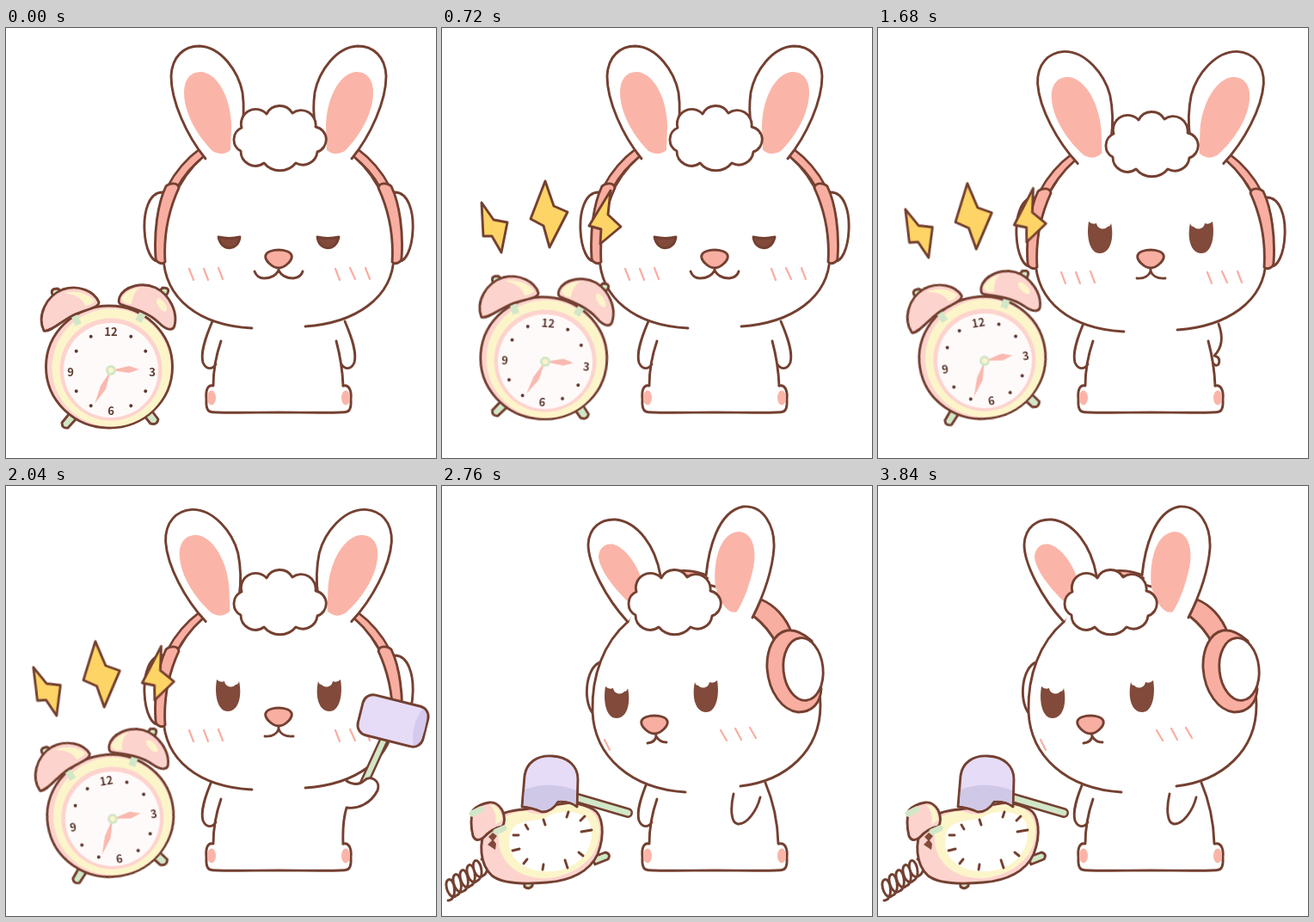
These frames come from a looping animation (500x500 px, 3960 ms). An HTML page:

```html
<!DOCTYPE html>
<html lang="en">
<head>
<meta charset="utf-8">
<title>Bunny and alarm clock</title>
<style>
html, body { margin: 0; width: 100%; height: 100%; overflow: hidden; background: #fff; }
svg { display: block; width: 100%; height: 100%; }
.ln { fill: none; stroke: #744031; stroke-width: 2.9; stroke-linecap: round; stroke-linejoin: round; }
.w { fill: #fff; }
.p { fill: #f9aea2; }
.ear { fill: #fab5a8; stroke: none; }
.dark { fill: #814a3a; }
.blush { fill: none; stroke: #f9aea2; stroke-width: 2.2; stroke-linecap: round; }
.rose { fill: #fdd3ce; }
.cream { fill: #fcf5ca; }
.mint { fill: #d1e7c7; }
.lilac { fill: #e6dcf8; }
.num { font: 700 13px "Noto Sans CJK SC", "Noto Sans", sans-serif; fill: #5c3a30; text-anchor: middle; }

/* one step is 120 ms, 33 steps in a loop */
.at, .dip { animation: 3960ms step-end infinite; }
.calm { animation-name: calm; }
.ring { animation-name: ring; }
.broken { animation-name: broken; }
.smile { animation-name: smile; }
.frown { animation-name: frown; }
.sleepy { animation-name: sleepy; }
.awake { animation-name: awake; }
.front { animation-name: front; }
.rest { animation-name: rest; }
.reach { animation-name: reach; }
.pull { animation-name: pull; }
.raise { animation-name: raise; }
.turned { animation-name: turned; }
.perk { animation-name: perk; }
.dip { animation-name: dip; }
@keyframes calm { 0% { opacity: 1 } 18.18%, 100% { opacity: 0 } }
@keyframes ring { 0%, 63.63%, 100% { opacity: 0 } 18.18% { opacity: 1 } }
@keyframes broken { 0% { opacity: 0 } 63.63%, 100% { opacity: 1 } }
@keyframes smile { 0% { opacity: 1 } 24.24%, 100% { opacity: 0 } }
@keyframes frown { 0%, 33.33%, 100% { opacity: 0 } 24.24% { opacity: 1 } }
@keyframes sleepy { 0% { opacity: 1 } 33.33%, 100% { opacity: 0 } }
@keyframes awake { 0%, 54.54%, 100% { opacity: 0 } 33.33% { opacity: 1 } }
@keyframes front { 0% { opacity: 1 } 54.54%, 100% { opacity: 0 } }
@keyframes rest { 0% { opacity: 1 } 39.39%, 100% { opacity: 0 } }
@keyframes reach { 0%, 45.45%, 100% { opacity: 0 } 39.39% { opacity: 1 } }
@keyframes pull { 0%, 54.54%, 100% { opacity: 0 } 45.45% { opacity: 1 } }
@keyframes raise { 0%, 63.63%, 100% { opacity: 0 } 54.54% { opacity: 1 } }
@keyframes turned {
  0% { opacity: 0; transform: translate(4px, 0) }
  54.54% { opacity: 1; transform: translate(4px, 0) }
  63.63%, 100% { opacity: 1; transform: none }
}
@keyframes perk { 0% { transform: rotate(var(--r)) } 63.63%, 100% { transform: none } }
@keyframes dip { 0% { transform: none } 33.33%, 100% { transform: translateY(var(--d)) } }

.shake { transform-origin: 122px 398px; animation: shake 360ms step-end infinite; }
.sway { transform-origin: 150px 410px; animation: sway 360ms step-end infinite; }
@keyframes shake {
  0%, 100% { transform: translate(-2px, -10px) rotate(4.4deg) }
  33.33% { transform: translate(1px, -10px) rotate(-4.4deg) }
  66.66% { transform: translate(2px, -11px) rotate(-9.4deg) }
}
@keyframes sway {
  0%, 100% { transform: none }
  33.33% { transform: rotate(-7deg) }
  66.66% { transform: rotate(-4deg) }
}
</style>
</head>
<body>
<svg viewBox="0 0 500 500">
<defs>
  <g id="cushion" class="ln">
    <path class="w" d="M183 191C166 190 160 214 161 235C162 258 170 272 177 271"/>
    <path d="M229 145Q206 162 193 187" stroke-linecap="butt" style="stroke-width:14"/>
    <path d="M229 145Q206 162 193 187" style="stroke:#f9aea2;stroke-width:9"/>
    <path d="M231 149Q210 165 199 186"/>
  </g>
  <path id="strip" class="ln p" d="M186 184C190 180 200 179 201 186C190 210 183 240 185 272C181 276 174 272 174 267C172 238 176 205 186 184Z"/>
  <g id="ear">
    <path class="ln w" d="M232 152C210 125 192 85 192 56C193 33 207 21 225 21C250 22 270 50 275 75C277 90 277 106 273 125"/>
    <path class="ear" d="M240 143C222 125 207 98 207 75C207 58 216 50 228 51C248 54 262 85 262 115L261 142Q251 150 240 143Z"/>
  </g>
  <path id="hair" class="ln w" d="M274 116A17 17 0 0 1 303 100A17 17 0 0 1 333 99A17 17 0 0 1 360 115A15 15 0 0 1 362 144A17 17 0 0 1 337 157A24 24 0 0 1 300 157A17 17 0 0 1 273 143A15 15 0 0 1 274 116Z"/>
  <path id="nose" class="ln p" d="M302 264C305 256 329 256 332 264C334 270 324 279 317 279C310 279 300 270 302 264Z"/>
  <path id="lid" class="ln dark" d="M247 243Q260 246 272 243C270 260 250 260 247 243Z"/>
  <path id="brow" class="ln" d="M262 239L270 236"/>
  <path id="eye" class="dark" d="M245 225Q249 229 254 227A7.5 7.5 0 0 0 267 231Q270 231 271 227C275 245 270 262 258 262C246 262 242 243 245 225Z"/>

  <g id="hammer">
    <path class="ln" d="M370 282L343 341" style="stroke-width:11"/>
    <path class="ln" d="M370 282L343 341" style="stroke:#d1e7c7;stroke-width:6"/>
    <g transform="rotate(14 380 261)">
      <rect class="ln lilac" x="341" y="237" width="78" height="48" rx="12"/>
      <path d="M410 239Q401 261 410 283Q418 281 418 261Q418 241 410 239Z" fill="#d6c9ee"/>
    </g>
  </g>

  <g id="clock">
    <g class="ln mint">
      <path d="M74 448L65 459Q65 466 72 465L82 454Z"/>
      <path d="M160 450L168 460Q176 462 177 455L168 443Z"/>
      <path d="M62 316L54 310Q51 303 60 303L68 309Z"/>
      <path d="M177 308L182 302Q191 302 188 308L183 316Z"/>
    </g>
    <ellipse class="ln rose" cx="120" cy="394" rx="73.5" ry="71"/>
    <ellipse class="cream" cx="122.5" cy="395" rx="69" ry="68.5"/>
    <circle class="rose" cx="122" cy="397" r="59.5"/>
    <circle cx="122" cy="398" r="55" fill="#fffafa"/>
    <path d="M79 333L84 345M160 330L154 341" stroke="#d1e7c7" stroke-width="8"/>
    <g class="ln rose">
      <path d="M44 352C36 335 46 312 66 304C84 298 103 306 108 319C108 325 95 327 80 333C65 340 52 354 44 352Z"/>
      <path d="M132 313C138 300 158 295 174 302C190 310 200 330 196 346C194 353 186 351 178 343C165 330 145 325 135 322C130 320 131 317 132 313Z"/>
    </g>
    <path class="cream" d="M68 308Q89 303 103 317Q100 322 92 323Q88 311 68 308ZM135 313Q142 303 156 302Q147 307 146 321Q134 320 135 313Z"/>
    <ellipse class="cream" cx="181" cy="322" rx="4" ry="9" transform="rotate(-35 181 322)"/>
    <circle cx="122" cy="399" r="46.5" fill="none" stroke="#5c3a30" stroke-width="4" stroke-linecap="round" pathLength="12" stroke-dasharray="0 1 0 2" transform="rotate(30 122 399)"/>
    <g class="num">
      <text x="122" y="358">12</text><text x="170" y="405">3</text>
      <text x="122" y="450">6</text><text x="75" y="405">9</text>
    </g>
    <path d="M122 398L143 393L155 397L143 401ZM122 398L116 420L103 437L110 416Z" fill="#f9b9b0"/>
    <circle cx="122" cy="398" r="6" class="mint"/>
    <circle cx="122" cy="398" r="3" class="cream"/>
  </g>
</defs>

<rect width="500" height="500" fill="#fff"/>

<g class="at calm"><use href="#clock"/></g>

<!-- body -->
<path class="ln" d="M240 341C231 362 226 378 229 389C233 398 240 397 244 391M250 364Q241 390 241 416C234 414 232 422 233 432Q232 446 239 446.5C250 448 290 447 317 447C345 447 384 448 395 446.5Q402 446 401 432C402 422 399 414 392 416"/>
<g class="ear"><ellipse cx="239" cy="430" rx="5" ry="8.5"/><ellipse cx="395" cy="430" rx="5" ry="8.5"/></g>
<path class="ln at rest" d="M394 341C403 362 408 378 405 389C401 398 394 397 390 391M384 364Q391 390 392 416"/>
<path class="ln at reach" d="M396 344C402 360 400 372 391 381Q399 383 396 391Q393 394 390 390M384 364Q391 390 392 416"/>
<path class="ln at broken" d="M376 345Q390 378 391 416M339 358C335 375 336 392 344 393C354 394 366 378 370 362"/>

<!-- head, facing ahead -->
<g class="at front">
  <g class="dip" style="--d:6px">
    <use href="#cushion"/>
    <use href="#cushion" transform="matrix(-1 0 0 1 634 0)"/>
  </g>
  <path class="ln w dip" style="--d:4px" d="M348 347C405 343 450 315 451 265C452 215 434 175 405 150C384 95 250 95 229 150C200 175 182 215 183 265C184 315 225 346 286 349"/>
  <g class="dip" style="--d:6px">
    <use href="#strip"/>
    <use href="#strip" transform="matrix(-1 0 0 1 634 0)"/>
  </g>
  <g class="at sleepy">
    <use href="#ear"/>
    <use href="#ear" transform="matrix(-1 0 0 1 634 0)"/>
    <use href="#lid"/>
    <use href="#lid" transform="matrix(-1 0 0 1 634 0)"/>
  </g>
  <g class="at awake">
    <g transform="translate(0 4)">
      <use href="#ear" transform="rotate(-4 255 150)"/>
      <use href="#ear" transform="matrix(-1 0 0 1 634 0) rotate(-4 255 150)"/>
    </g>
    <use href="#eye"/>
    <use href="#eye" transform="matrix(-1 0 0 1 634 0)"/>
    <path class="ln" d="M301 291Q313 292 317 283Q321 292 334 291"/>
  </g>
  <g class="at frown">
    <use href="#brow"/>
    <use href="#brow" transform="matrix(-1 0 0 1 634 0)"/>
    <path class="ln" d="M301 292Q313 291 317 283Q321 291 334 292"/>
  </g>
  <path class="ln at smile" d="M289 283Q292 291 300 291Q312 291 317 282Q322 291 334 291Q343 290 345 283"/>
  <g class="dip" style="--d:7px"><use href="#hair"/></g>
  <path class="ln" d="M317 279V283"/>
  <use href="#nose"/>
  <path class="blush dip" style="--d:4px" d="M213 280l5 13m12-13l5 13m12-14l5 13M383 280l5 13m12-14l6 13m12-13l5 13"/>
</g>

<g class="at pull">
  <use href="#hammer" transform="translate(70 12)"/>
  <path class="ln w" d="M396 343Q408 350 416 343C424 335 436 343 432 354C424 370 408 376 396 374Q391 390 392 416"/>
</g>

<!-- head, turned to the clock -->
<g class="at turned">
  <path class="ln w" d="M184 205C166 211 163 255 178 267"/>
  <path class="ln p" d="M266 100Q290 95 310 105L306 110Z"/>
  <path class="ln w" d="M347 349C400 343 440 308 440 255C440 205 395 160 361 150C340 100 235 100 216 158C188 182 174 220 175 262C177 315 220 352 283 356"/>
  <path class="ln p" d="M362 151L371 132C386 138 400 152 407 172L389 184Q380 165 362 151Z"/>
  <g class="at perk" style="--r:2.5deg;transform-origin:235px 150px">
    <path class="ln w" d="M216 158C190 130 170 90 170 68C171 48 185 38 202 39C228 42 248 70 254 104"/>
    <path class="ear" d="M222 140C202 122 183 98 182 82C183 70 192 66 200 68C216 73 232 100 233 115Z"/>
  </g>
  <g class="at perk" style="--r:-3.5deg;transform-origin:335px 135px">
    <path class="ln w" d="M307 104C310 75 320 30 350 24C375 22 387 48 386 72C384 100 375 125 361 153"/>
    <path class="ear" d="M318 118C315 95 320 55 345 53C362 54 366 75 362 95C358 115 350 135 343 146C335 150 325 140 318 118Z"/>
  </g>
  <use href="#hair" x="-48" y="7"/>
  <path class="ln p" d="M401 168C386 171 377 190 378 212C380 240 396 261 414 263C430 263 440 253 441 236L430 180Q414 166 401 168Z"/>
  <ellipse class="ln w" cx="420" cy="213" rx="23" ry="36.5" transform="rotate(-6 420 213)"/>
  <use href="#eye" x="-55" y="8"/>
  <use href="#eye" transform="matrix(-1 0 0 1 565 1)"/>
  <path class="ln" d="M239 299Q248 298 249 291Q253 298 261 298M248 285L249 291"/>
  <use href="#nose" x="-70" y="9"/>
  <path class="blush" d="M189 295l6 12M324 284l7 12m10-14l7 13m10-14l7 12"/>
</g>

<g class="at raise">
  <use href="#hammer"/>
  <path class="ln w" d="M356 359C348 350 343 336 350 329C356 322 368 322 374 331C386 350 390 380 392 416"/>
</g>

<!-- ringing -->
<g class="at ring">
  <g class="shake"><use href="#clock"/></g>
  <g class="sway ln" style="fill:#fdd465">
    <path d="M46 203L60 223L76 226L69 261L58 242L48 242Z"/>
    <path d="M120 178L130 207L146 214L125 255L118 230L103 222Z"/>
    <path d="M196 189L193 217L208 231L184 251L185 234L171 230Z"/>
  </g>
</g>

<!-- smashed clock -->
<g class="at broken">
  <path class="ln" d="M7 482c12 0 8-28 0-24c-6 4 2 26 10 18c10-4 4-28-2-24c-6 4 2 26 10 19c10-4 4-28-2-24c-6 4 2 26 10 18c10-4 4-28-2-24c-6 4 2 26 10 18c10-5 3-27-3-23c-5 5 2 24 10 17c9-6 3-23-2-19"/>
  <g class="ln mint">
    <path d="M95 456L96 466Q101 470 105 465L106 454Z"/>
    <path d="M174 432L190 426Q197 428 193 434L178 440Z"/>
  </g>
  <path class="ln rose" d="M52 396C42 415 44 440 58 453C72 464 100 463 122 461C150 459 172 448 181 428C190 405 187 382 176 376Q165 370 150 368L95 376Q72 378 66 384Z"/>
  <path class="cream" d="M74 384Q88 377 98 378Q112 384 124 380Q135 368 155 371Q180 374 183 397C185 425 165 450 125 456C95 458 72 443 67 420C64 403 66 392 74 384Z"/>
  <path fill="#fff" d="M79 405C84 387 106 391 120 386C134 376 162 376 171 390C180 412 168 438 140 446C108 454 72 440 79 405Z"/>
  <path class="ln" stroke-linecap="butt" d="M83 406h6M82 424l8-2M95 439l4-5M117 446l1-6M146 444l-3-9M164 430l-5-4M174 400l-12 2M166 384l-5 5M147 379l-2 6M118 388l2 6M97 394l3 5"/>
  <path class="ln rose" d="M36 377Q32 390 36 407Q40 415 48 409Q58 398 70 396Q75 389 70 377Q64 367 55 368Q43 370 36 377Z"/>
  <path class="cream" d="M56 371Q68 371 70 388L62 394Q65 379 56 371Z"/>
  <path d="M35 381L45 376M63 402L72 398" stroke="#d1e7c7" stroke-width="7" stroke-linecap="round"/>
  <path class="dark" d="M59 403L54 408L58 412L53 417L62 423L63 416L60 412L64 407Z"/>
  <path class="ln" d="M158 363L216 380" style="stroke-width:12"/>
  <path class="ln" d="M158 363L216 380" style="stroke:#d1e7c7;stroke-width:7"/>
  <path class="ln lilac" d="M93 373L96 337C98 322 110 313 128 314C147 315 158 326 158 341L157 373Q148 366 135 367Q128 379 116 379Q105 374 93 373Z"/>
  <path d="M96 353Q126 342 156 354L155 370Q146 364 134 366Q127 377 116 377Q106 373 95 371Z" fill="#cfc8e6"/>
</g>
</svg>
</body>
</html>
```
